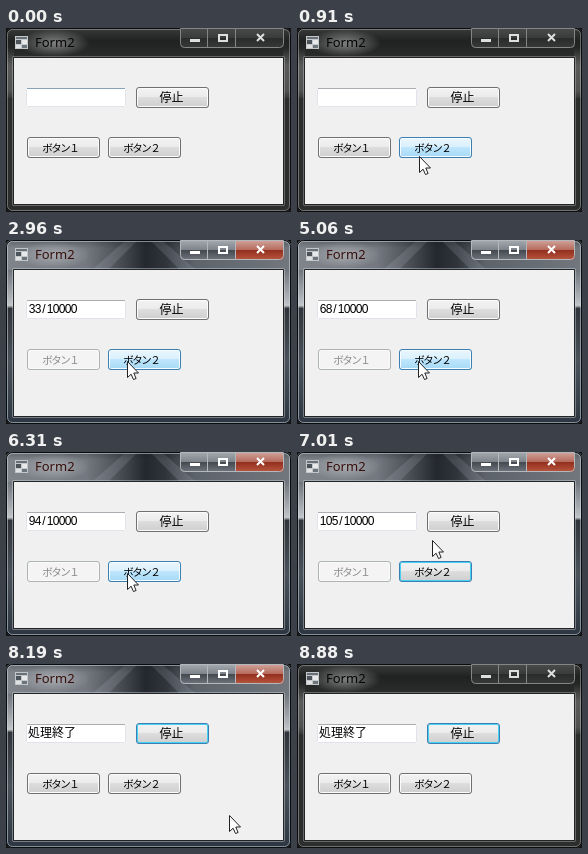
Animation of 285 by 184 pixels, one loop 9060 ms. Source, as an HTML page with a canvas:

```html
<!DOCTYPE html>
<html lang="ja">
<head>
<meta charset="utf-8">
<style>
html, body { margin: 0; width: 100%; height: 100%; overflow: hidden; background: #111; }
canvas { display: block; }
</style>
</head>
<body>
<canvas id="stage" width="285" height="184"></canvas>
<script>
const ctx = document.getElementById('stage').getContext('2d');
const LOOP = 9060;
const ACTIVATE = 1280, START = 1730, STOP_PRESS = 7280, FINISH = 7800, DEACTIVATE = 8880;
const JP = '"Noto Sans CJK JP", "Noto Sans CJK", sans-serif';

// [time, processed items]
const COUNTS = [
  [1730, 9], [1990, 15], [2300, 21], [2630, 27], [2960, 33], [3240, 37], [3540, 42],
  [3870, 47], [4150, 52], [4470, 58], [4790, 63], [5060, 68], [5390, 75], [5710, 82],
  [6000, 88], [6310, 94], [6630, 100], [6920, 105], [7240, 110], [7560, 115]
];

// Pointer moves: start time, step length, step count, from, to, easing power
const MOVES = [
  [680, 46, 9, [130, 183], [121, 121], 2],
  [6920, 45, 3, [121, 121], [135, 88], 1],
  [7055, 45, 4, [135, 88], [140, 68], 1.5],
  [7846, 46, 13, [140, 68], [262, 190], 1.2]
];

// indent: distance from the left edge to the middle of the first character
const BUTTONS = {
  stop: { x: 130, y: 59, label: '停止', size: 12, indent: 29.5, pitch: 12 },
  one: { x: 21, y: 109, label: 'ボタン１', size: 10.5, indent: 20.5, pitch: 9 },
  two: { x: 102, y: 109, label: 'ボタン２', size: 10.5, indent: 20.5, pitch: 9 }
};
const BW = 73, BH = 21;

const SKINS = {
  normal: ['#707070', '#fcfcfc', '#f2f2f2', '#ebebeb', '#dddddd', '#cfcfcf'],
  focus: ['#3c7fb1', '#46d0f5', '#f2f2f2', '#ebebeb', '#dddddd', '#cfcfcf'],
  hot: ['#3c7fb1', '#f6fcff', '#eaf6fd', '#d9f0fc', '#bee6fd', '#a7d9f5'],
  pressed: ['#2c628b', '#9eb0ba', '#e5f4fc', '#c4e5f6', '#98d1ef', '#68b3db'],
  disabled: ['#adb2b5', '#fafafa', '#f4f4f4', '#f4f4f4', '#f4f4f4', '#f4f4f4']
};

function fillRect(x, y, w, h, color) {
  ctx.fillStyle = color;
  ctx.fillRect(x, y, w, h);
}

function outline(x, y, w, h, r, color) {
  ctx.beginPath();
  ctx.roundRect(x + .5, y + .5, w - 1, h - 1, r);
  ctx.strokeStyle = color;
  ctx.lineWidth = 1;
  ctx.stroke();
}

function gradient(x0, y0, x1, y1, stops) {
  const g = ctx.createLinearGradient(x0, y0, x1, y1);
  stops.forEach(([at, color]) => g.addColorStop(at, color));
  return g;
}
const vertical = (y0, y1, ...stops) => gradient(0, y0, 0, y1, stops);
const horizontal = (x0, x1, ...stops) => gradient(x0, 0, x1, 0, stops);

// Fixed-pitch text, one cell per character
function cells(text, firstCenter, baseline, pitch, font, color) {
  ctx.font = font;
  ctx.fillStyle = color;
  ctx.textAlign = 'center';
  [...text].forEach((ch, i) => ctx.fillText(ch, firstCenter + i * pitch, baseline));
}

function drawActiveGlass() {
  fillRect(0, 0, 285, 184, vertical(28, 184, [0, '#6c7178'], [.22, '#b9bcc0'], [.24, '#c4c6c8'],
    [.26, '#30343a'], [.6, '#4b525a'], [1, '#2d3640']));
  fillRect(0, 0, 285, 30, horizontal(0, 285, [0, '#80858c'], [.28, '#747981'], [.38, '#50555c'],
    [.49, '#24282e'], [.56, '#2f343b'], [.66, '#5d636b'], [1, '#72777e']));
  // Crossing reflections in the title bar
  ctx.fillStyle = 'rgba(190,200,212,.16)';
  for (const slant of [-1, 1]) {
    ctx.beginPath();
    ctx.moveTo(138 + slant * 6, 0);
    ctx.lineTo(138 + slant * 18, 0);
    ctx.lineTo(138 + slant * 52, 30);
    ctx.lineTo(138 + slant * 36, 30);
    ctx.fill();
  }
  fillRect(0, 0, 285, 8, vertical(0, 8, [0, 'rgba(20,24,30,.3)'], [1, 'rgba(20,24,30,0)']));
}

function drawInactiveGlass() {
  fillRect(0, 0, 285, 184,
    vertical(0, 184, [0, '#3a3b3b'], [.07, '#202121'], [.16, '#2b2c2c'], [1, '#2c2d2d']));
  const side = vertical(20, 70, [0, 'rgba(255,255,255,0)'], [.35, 'rgba(255,255,255,.22)'],
    [.85, 'rgba(255,255,255,.18)'], [1, 'rgba(255,255,255,.05)']);
  fillRect(0, 20, 8, 50, side);
  fillRect(277, 20, 8, 50, side);
}

function drawTitle(active) {
  const glow = ctx.createRadialGradient(0, 0, 4, 0, 0, 36);
  glow.addColorStop(0, `rgba(225,225,225,${active ? .4 : .45})`);
  glow.addColorStop(1, 'rgba(225,225,225,0)');
  ctx.save();
  ctx.translate(48, 15);
  ctx.scale(1, .38);
  fillRect(-40, -36, 80, 72, glow);
  ctx.restore();

  // Form icon
  fillRect(9, 8, 13, 13, '#c3c7ca');
  fillRect(10, 9, 11, 2, '#687078');
  fillRect(10, 12, 5, 4, '#4c5359');
  fillRect(16, 12, 5, 4, '#e6e8e9');
  fillRect(10, 17, 5, 3, '#dfe1e2');
  fillRect(16, 17, 5, 3, '#6d757c');

  ctx.font = '13px "Noto Sans", sans-serif';
  ctx.textAlign = 'left';
  ctx.fillStyle = active ? '#360f0c' : '#050505';
  ctx.fillText('Form2', 29, 19);
}

function drawFrame(active) {
  fillRect(0, 0, 285, 184, '#111');
  ctx.save();
  ctx.beginPath();
  ctx.roundRect(0, 0, 285, 184, 6);
  ctx.clip();
  if (active) drawActiveGlass(); else drawInactiveGlass();
  ctx.restore();

  outline(0, 0, 285, 184, 6, '#0b0b0b');
  outline(1, 1, 283, 182, 5, active ? 'rgba(200,218,235,.55)' : 'rgba(255,255,255,.32)');
  outline(6, 28, 273, 150, 1, active ? 'rgba(220,230,240,.4)' : 'rgba(255,255,255,.28)');
  outline(7, 29, 271, 148, 0, '#242424');
  fillRect(8, 30, 269, 146, '#f0f0f0');
  drawTitle(active);
  drawCaptionButtons(active);
}

function drawCaptionButtons(active) {
  const edge = active ? '#b4b8bd' : '#858585';
  const glass = active
    ? vertical(1, 20, [0, '#a2a7ad'], [.48, '#7d838a'], [.5, '#454a51'], [1, '#70767e'])
    : vertical(1, 20, [0, '#484949'], [.48, '#393a3a'], [.5, '#2a2b2b'], [1, '#373838']);
  const red = vertical(1, 20, [0, '#cfa097'], [.48, '#b5685a'], [.5, '#93301f'], [1, '#b8573f']);
  ctx.beginPath();
  ctx.roundRect(175, 1, 103, 19, [0, 0, 4, 4]);
  ctx.fillStyle = glass;
  ctx.fill();
  if (active) {
    ctx.beginPath();
    ctx.roundRect(230, 1, 48, 19, [0, 0, 4, 0]);
    ctx.fillStyle = red;
    ctx.fill();
  }
  ctx.beginPath();
  ctx.roundRect(174.5, .5, 103, 19, [0, 0, 4, 4]);
  ctx.strokeStyle = edge;
  ctx.lineWidth = 1;
  ctx.stroke();
  fillRect(201, 1, 1, 18, edge);
  fillRect(229, 1, 1, 18, edge);

  const mark = active ? '#fff' : '#dedede';
  fillRect(184, 11, 10, 3, mark);
  ctx.strokeStyle = mark;
  ctx.lineWidth = 2;
  ctx.strokeRect(213, 7, 8, 6);
  ctx.beginPath();
  ctx.moveTo(251, 6); ctx.lineTo(258, 13);
  ctx.moveTo(258, 6); ctx.lineTo(251, 13);
  ctx.stroke();
}

function drawButton({ x, y, label, size, indent, pitch }, state) {
  const [border, inner, ...shade] = SKINS[state];
  ctx.beginPath();
  ctx.roundRect(x, y, BW, BH, 3);
  ctx.fillStyle = vertical(y + 1, y + BH - 1,
    [0, shade[0]], [.49, shade[1]], [.5, shade[2]], [1, shade[3]]);
  ctx.fill();
  outline(x + 1, y + 1, BW - 2, BH - 2, 1.5, inner);
  outline(x, y, BW, BH, 2.5, border);
  cells(label, x + indent, y + 15, pitch, `${size}px ${JP}`,
    state === 'disabled' ? '#8c8c8c' : '#000');
}

function drawTextBox(t) {
  fillRect(20, 60, 100, 19, '#fff');
  outline(20, 60, 100, 19, 1, '#e2e3ea');
  fillRect(21, 60, 98, 1, t < 30 ? '#86a5bd' : t < 90 ? '#9aa9b8' : '#abadb3');
  if (t >= FINISH) {
    cells('処理終了', 28, 73, 12, `12px ${JP}`, '#000');
  } else if (t >= START) {
    const count = COUNTS.findLast(([time]) => t >= time)[1];
    cells(count + '/10000', 26, 73, 6, '12px "Liberation Sans", sans-serif', '#000');
  }
}

function pointerAt(t) {
  const move = MOVES.findLast(([start]) => t >= start);
  if (!move) return null;
  const [start, step, steps, from, to, power] = move;
  const k = Math.min(1, (Math.floor((t - start) / step) + 1) / steps);
  const eased = 1 - (1 - k) ** power;
  return from.map((v, i) => Math.round(v + (to[i] - v) * eased));
}

function drawPointer([x, y], clicking) {
  if (clicking) {
    ctx.beginPath();
    ctx.arc(x, y, 11.5, 0, Math.PI * 2);
    ctx.fillStyle = 'rgba(238,238,40,.6)';
    ctx.fill();
  }
  ctx.save();
  ctx.translate(x + .5, y + .5);
  ctx.fillStyle = '#fff';
  ctx.strokeStyle = '#222';
  ctx.lineWidth = 1;
  const arrow = new Path2D('M0 0V16L3.6 12.7L6 18L8.6 17L6.3 11.5H11Z');
  ctx.fill(arrow);
  ctx.stroke(arrow);
  ctx.restore();
}

function render(t) {
  const pointer = pointerAt(t);
  const clicking = (t >= ACTIVATE && t < 1380) || (t >= STOP_PRESS && t < 7660);
  const focused = t < ACTIVATE ? null : t < STOP_PRESS ? 'two' : 'stop';

  drawFrame(t >= ACTIVATE && t < DEACTIVATE);
  drawTextBox(t);
  for (const [name, b] of Object.entries(BUTTONS)) {
    const over = pointer && pointer[0] >= b.x && pointer[0] < b.x + BW
      && pointer[1] >= b.y && pointer[1] < b.y + BH;
    const disabled = name === 'one' && t >= START && t < FINISH;
    drawButton(b, disabled ? 'disabled' : over ? (clicking ? 'pressed' : 'hot')
      : name === focused ? 'focus' : 'normal');
  }
  if (pointer) drawPointer(pointer, clicking);
}

const begin = performance.now();
function tick() {
  render((performance.now() - begin) % LOOP);
  requestAnimationFrame(tick);
}
tick();
</script>
</body>
</html>
```
